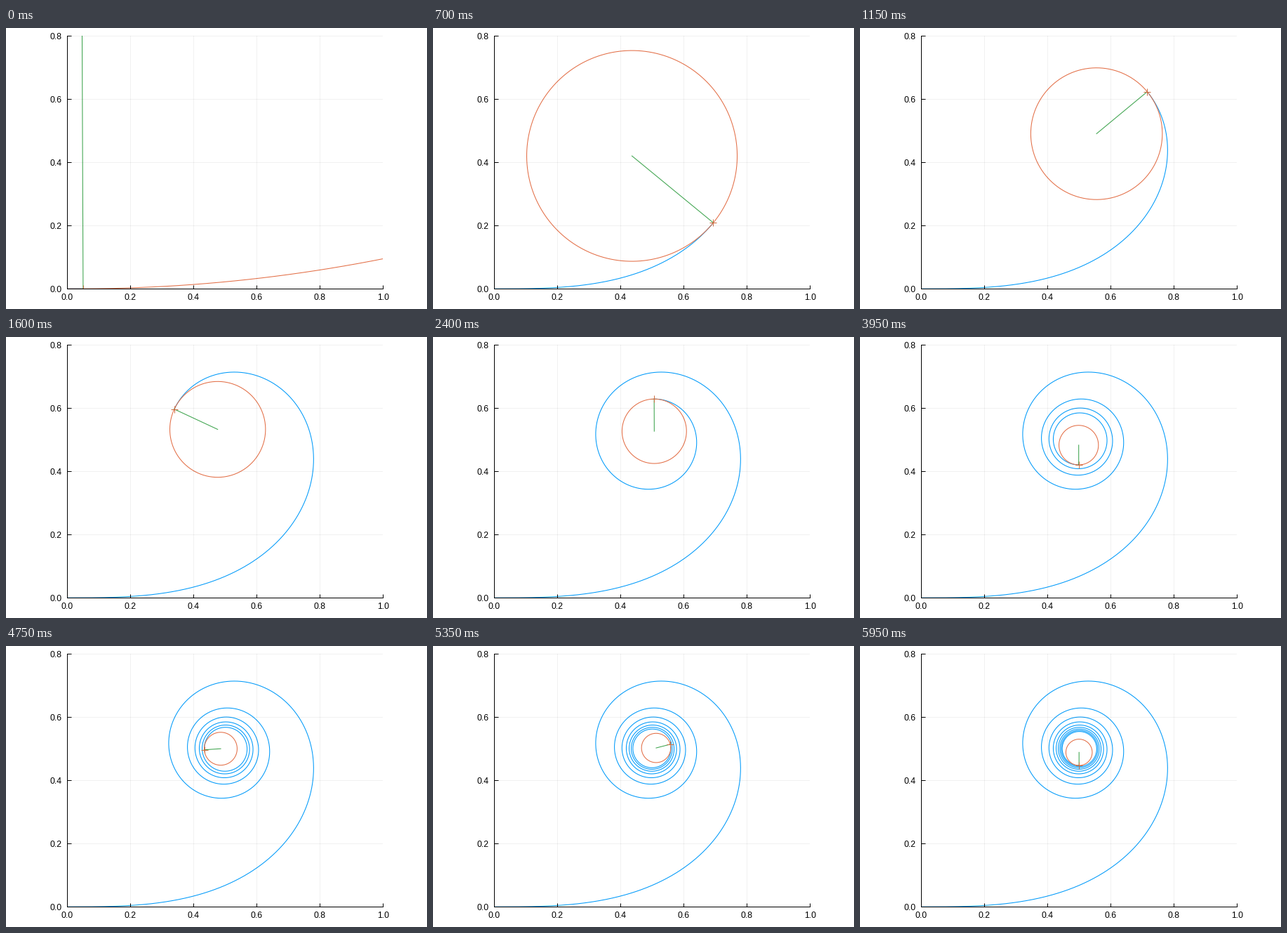
A matplotlib script for the animation above (6000 ms loop, 600 by 400 pixels).

```python
import numpy as np
import matplotlib.pyplot as plt
from matplotlib.animation import FuncAnimation

W, H, DPI = 600, 400, 100
LEFT, BASE, UNIT = 87.4, 371.25, 450  # plot origin and pixels per unit
FRAMES, INTERVAL = 120, 50
STEP, SUB = 0.05, 100
BLUE, ORANGE, GREEN = "#009afa", "#e36f47", "#3ea44e"
MARK = "#cc6f43"
PX = 72 / DPI  # one pixel in points

plt.rcParams["font.family"] = "Liberation Sans"


def cumulative(f, dt):
    """Running trapezoid integral starting at zero."""
    return np.concatenate([[0], np.cumsum((f[1:] + f[:-1]) * dt / 2)])


# Euler spiral from the Fresnel integrals
t = np.linspace(0, FRAMES * STEP, FRAMES * SUB + 1)
phase = np.pi * t**2 / 2
cx = cumulative(np.cos(phase), t[1])
cy = cumulative(np.sin(phase), t[1])
turn = np.linspace(0, 2 * np.pi, 721)

fig = plt.figure(figsize=(W / DPI, H / DPI), dpi=DPI, facecolor="white")
ax = fig.add_axes([LEFT / W, (H - BASE) / H, UNIT / W, 0.8 * UNIT / H])
ax.set(xlim=(0, 1), ylim=(0, 0.8))
ax.set_xticks(np.arange(6) / 5)
ax.set_yticks(np.arange(5) / 5)
ax.xaxis.set_major_formatter("{x:.1f}")
ax.yaxis.set_major_formatter("{x:.1f}")
ax.tick_params(direction="in", length=5.5 * PX, width=PX, labelsize=12.2 * PX)
ax.tick_params(axis="x", pad=6.8 * PX)
ax.tick_params(axis="y", pad=8 * PX)
ax.grid(color="black", alpha=0.07, linewidth=0.8 * PX)
ax.set_axisbelow(False)
ax.spines[["top", "right"]].set_visible(False)
for side in ("left", "bottom"):
    ax.spines[side].set_linewidth(PX)
for line in ax.get_xgridlines() + ax.get_ygridlines():
    line.set_zorder(0.5)


def curve(color, **style):
    return ax.plot([], [], color=color, linewidth=1.05 * PX, snap=False,
                   zorder=2, **style)[0]


spiral = curve(BLUE)
circle = curve(ORANGE)
radius = curve(GREEN)
cross = curve(MARK, marker="+", markersize=10 * PX, markeredgewidth=PX)


def update(i):
    n = (i + 1) * SUB
    x, y, a = cx[n], cy[n], phase[n]
    r = 0.25 / t[n]
    ox, oy = x - r * np.sin(a), y + r * np.cos(a)
    spiral.set_data(cx[:n + 1:2], cy[:n + 1:2])
    circle.set_data(ox + r * np.sin(turn + a), oy - r * np.cos(turn + a))
    radius.set_data([x, ox], [y, oy])
    cross.set_data([x], [y])
    return spiral, circle, radius, cross


anim = FuncAnimation(fig, update, frames=FRAMES, interval=INTERVAL,
                     repeat=True, repeat_delay=0, blit=False)
plt.show()
```
